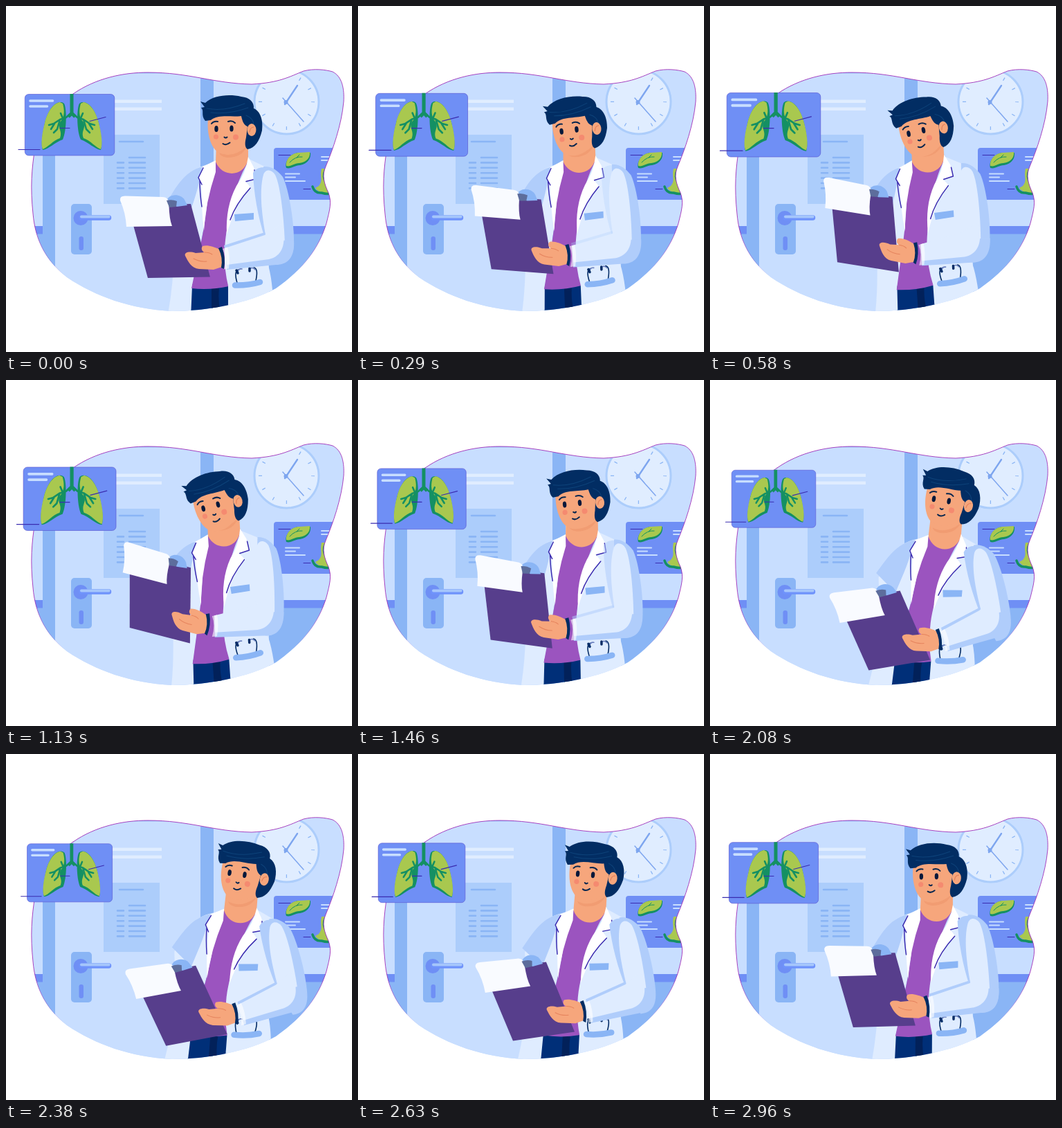
These frames come from a looping animation (500x500 px, 3 s). An HTML page:

```html
<!DOCTYPE html>
<html lang="en">
<head>
<meta charset="utf-8">
<title>Doctor with clipboard</title>
<style>
  html, body { margin: 0; width: 100%; height: 100%; overflow: hidden; background: #fff }
  svg { display: block; width: 100vw; height: 100vh }
  path { stroke-linecap: round; stroke-linejoin: round }
  .bg { fill: #c8deff } .mid { fill: #8ab5f5 } .board { fill: #6f8ff5 }
  .coat { fill: #dfecff } .shade { fill: #b0cdfb } .white { fill: #fff }
  .skin { fill: #f6a67c } .navy { fill: #022d63 } .lime { fill: #a9c84f } .green { fill: #149063 }
  .ink { fill: none; stroke: #3a2cb0; stroke-width: 1.5 }
  .vein { fill: none; stroke: #149063; stroke-width: 2.6 }
  .text { fill: none; stroke: #c8deff; stroke-width: 3.6 }
  .face { fill: none; stroke: #06264f; stroke-width: 2 }
</style>
</head>
<body>
<svg viewBox="0 0 500 500">
  <defs>
    <path id="blob" d="M97 127C130 104 170 96 205 96C265 96 300 112 355 113C395 111 410 102 430 94C445 90 462 92 472 95C486 102 489 120 488 138C485 172 472 208 462 232C456 245 460 257 466 270C471 284 468 294 463 314C452 350 430 380 390 408C350 430 290 441 240 441C180 438 130 420 88 392C55 366 42 335 39 300C35 262 37 235 42 205C48 165 70 145 97 127Z"/>
    <clipPath id="room"><use href="#blob"/></clipPath>
    <linearGradient id="rim" gradientUnits="userSpaceOnUse" x1="0" y1="320" x2="0" y2="390">
      <stop offset="0" stop-color="#a030b8"/>
      <stop offset="1" stop-color="#a030b8" stop-opacity="0"/>
    </linearGradient>
    <g id="lung">
      <path class="green" d="M80 139C70 138 61 150 56 169C53 184 50 200 53 208C62 207 70 197 82 193C88 180 88 148 84 141Q82 139 80 139Z"/>
      <path class="lime" d="M78 139C69 140 60 152 56 169C52 184 50 200 53 207C60 205 68 194 78 191C82 180 74 177 78 168C86 160 84 148 82 141Z"/>
      <path class="vein" d="M95 154L87 161L78 164L69 170L62 172M78 164L74 178L69 183M70 170L65 178M82 162L79 155"/>
    </g>
  </defs>

  <g clip-path="url(#room)">
    <path class="bg" d="M0 80H500V450H0Z"/>
    <path class="mid" d="M30 324H71V450H30ZM380 324H500V450H380Z"/>
    <path class="board" d="M30 318H53V329.500H30ZM380 318H480V329.500H380Z"/>
    <path class="mid" d="M53 80H300V450H281V97.500H71V450H53Z"/>
    <path class="bg" d="M71 97.500H281V450H71Z"/>
    <path fill="#e0edff" d="M120 135.500H225V140H120ZM120 146.500H225V151H120Z"/>
    <path fill="#accdfb" d="M141 186H222V286H141Z"/>
    <path id="rows" fill="none" stroke="#8ab5f5" stroke-width="2.6"/>

    <rect class="mid" x="94" y="286" width="30" height="73" rx="5"/>
    <circle class="board" cx="108" cy="306.500" r="10.500"/>
    <path d="M109 306H148.500" stroke="#6f93fb" stroke-width="7.500"/>
    <path d="M109 304.500H148.500" stroke="#a5c6fb" stroke-width="4"/>
    <rect class="board" x="105.500" y="333" width="6.500" height="20" rx="3.200"/>

    <circle cx="405.500" cy="138.500" r="46.500" fill="#e0edff" stroke="#accdfb" stroke-width="3"/>
    <circle cx="405.500" cy="138.500" r="38" fill="none" stroke="#8ab5f5" stroke-width="5" stroke-dasharray="1.300 18.597" stroke-dashoffset=".65"/>
    <path d="M403 142L421 115" stroke="#7ea6ef" stroke-width="2.400"/>
    <path d="M400 133L430 167" stroke="#7ea6ef" stroke-width="1.500"/>
    <circle cx="404.500" cy="139" r="3" fill="#7ea6ef"/>

    <rect class="board" x="387" y="205" width="100" height="75" rx="4"/>
    <path class="green" d="M405 234C402 224 412 212 424 212L440 212C441 220 436 228 425 230C417 230 412 236 405 234Z"/>
    <path class="lime" d="M405 231C404 221 413 212 424 212L439 211C440 218 435 226 424 227C416 227 411 233 405 231Z"/>
    <path class="vein" style="stroke-width:1" d="M410 226Q418 217 428 218M420 219L424 215"/>
    <path class="lime" d="M456 235C453 247 459 252 452 260L447 263C452 271 466 272 475 268V235Z"/>
    <path class="vein" d="M443 261Q446 271 456 270Q466 273 472 270M461 238Q457 247 463 256" style="stroke-width:3.5"/>
    <path class="text" style="stroke-width:2" d="M456 218H470M456 223H470M404 242.500H424M404 247.500H418M404 253H432"/>
    <path class="ink" style="stroke-width:1" d="M394 215.500H411M430 264.500H440"/>

    <g id="body">
      <path fill="#002f78" d="M268 402H322V450H266Z"/>
      <path d="M297 408H308Q306 424 310 445H297Z" fill="#02215a"/>
      <path class="coat" d="M300 226L282 232C255 242 247 262 236 290L243 360Q241 410 233 450H267L269 405L290 300Z"/>
      <path class="shade" d="M284 232C257 239 246 262 232 284L262 310L272 280Q278 262 284 232Z"/>
      <path fill="#9b54bf" d="M301 226L352 221L342 240C328 272 320 300 317 350Q316 380 322 405Q295 411 268 408L278 360Q289 310 291 280Z"/>
      <path class="skin" d="M304 200L350 190V222C343 248 312 248 303 225Z"/>
      <path fill="#f19c72" d="M308 212Q327 221 348 203Q341 219 320 219Q310 218 308 212Z"/>
      <path class="coat" d="M351 221L382 236C394 248 389 330 378 372Q386 395 387 450H321L321 404Q315 380 316 350C319 305 330 285 349 255Z"/>
      <path class="white" d="M303 223L285 232L278 249L283 262Q282 290 286 325Q288 285 303 240Z"/>
      <path class="ink" d="M285 234L278 248L283 258M280 252Q280 270 283 290"/>
      <path class="white" d="M350 218L358 233L361 250L347 254L353 262Q331 287 319 330Q317 290 333 260Q347 240 350 218Z"/>
      <path class="ink" d="M359 237L361 250L347 253.500M353 263Q332 286 324 309"/>
      <path class="mid" d="M330 301L358 299V308.500L331 311Z"/>
      <g fill="none" stroke="#042c66" stroke-width="1.600">
        <path d="M334 400Q329 383 336 381M361 397Q365 379 358 378"/>
        <path d="M335 384Q336 379 341 380M360 381Q357 377 353 379" stroke="#6a7fbd"/>
        <path d="M333 382L335 386M352 379V383" stroke-width="3.500"/>
      </g>
      <path d="M331 403.500Q350 404 367 399" stroke="#8ab5f5" stroke-width="8.500" fill="none"/>

      <g id="arm">
        <path class="shade" d="M372 232C383 231 392 237 400 247C409 265 417 315 416 345C415 366 405 373 392 373L376 336Z"/>
        <path class="shade fold" d="M357 241C362 233 372 231 384 236L392 340L374 335C364 305 358 270 357 241Z"/>
        <path class="coat" d="M372 244C375 235 384 236 389 244C397 260 402 310 403 345L388 360L376 336C369 300 366 265 372 244Z"/>
      </g>

      <g id="head">
        <path class="skin" d="M292 164C290 185 296 206 308 212C322 218 342 212 350 194L354 160C345 148 300 148 292 164Z"/>
        <path class="navy" d="M281 138L288 140C300 129 322 127 340 131C352 132 359 139 358 148C368 152 372 166 370 180C366 196 360 205 349 207C345 204 345 198 347 190L349 174C344 172 342 168 340 159C325 161 307 156 296 165L288 166C281 158 287 151 282 147L287 146Z"/>
        <path fill="none" stroke="#0d4279" stroke-width="1" d="M290 148Q315 153 345 141M296 154Q322 157 350 147M347 158Q357 162 358 171"/>
        <ellipse class="skin" cx="355" cy="179" rx="6.500" ry="9"/>
        <path d="M352 182Q353 175 358 175" fill="none" stroke="#e5835d" stroke-width="1.200"/>
        <g fill="#f58a70"><circle cx="303.500" cy="189" r="3.600"/><circle cx="332" cy="189.500" r="4"/></g>
        <path class="face" d="M297 170Q300 166 306 167M321 167Q327 165 331 169M313.500 199Q318 202 323.500 197.500"/>
        <path class="face" d="M315.500 189.500Q317.500 191.500 319.500 189.500"/>
        <g id="eyes" fill="#06183a">
          <ellipse cx="304" cy="177.500" rx="2.700" ry="4.500"/>
          <ellipse cx="326" cy="177" rx="2.700" ry="4.500"/>
        </g>
      </g>
    </g>

    <g id="clip">
      <path fill="#573e8c" d="M176 288L267 286L295 391.500L205 393Z"/>
      <path class="mid" d="M231 285C233 271 251 270 258 280L262 288L247 290Z"/>
      <path fill="#f9fbff" d="M165 281Q164 274.500 172 274.500L226 276Q236 276 235.500 288Q236 308 240 318L174 319Q173 299 165 281Z"/>
      <path fill="#5d6d9c" d="M232 281Q240 279 247 282L246 290L236 291Z"/>
    </g>

    <g id="fore">
      <path class="shade fold" d="M315 346L374 327L378 340L317 356Z"/>
      <path class="shade" d="M317 356L378 340L416 338C418 364 406 374 390 374L319 381Z"/>
      <path class="coat" d="M316 350L374 331L398 315C407 345 398 362 380 366L319 374Z"/>
      <path class="white" opacity=".6" d="M313 351L320 348.500Q324 362 322 379.500L315 380.500Q319 364 313 351Z"/>
    </g>

    <g id="hand">
      <path class="skin" d="M311 353C300 347 290 345 284 347C281 351 284 355 287 356L274 357C265 354 257 356 259 361C263 369 268 379 279 380L300 381L312 377Q315 362 311 353Z"/>
      <path d="M287 356Q294 356 298 359M271 365Q280 370 290 369" fill="none" stroke="#e5835d" stroke-width="1"/>
      <path class="navy" d="M307 350L312 348Q318 364 315 380L311 378Q314 364 307 350Z"/>
    </g>
  </g>
  <use href="#blob" fill="none" stroke="url(#rim)" stroke-width=".9"/>

  <g id="chart">
    <rect class="board" x="27.300" y="127.500" width="129.500" height="88.500" rx="5.500" stroke="#5650cf" stroke-width=".6"/>
    <path class="text" d="M35 137H67.500M35 145H59.500"/>
    <use href="#lung"/>
    <use href="#lung" transform="matrix(-1 0 0 1 190 0)"/>
    <path class="vein" style="stroke-width:5;stroke-linecap:butt" d="M95 127V155L90 160M95 155L100 160"/>
    <path class="ink" style="stroke-width:1.200" d="M18 207.500H49M78 176.500H92M121 166.500L144 160.500"/>
  </g>
</svg>
<script>
const LOOP = 3000;
const times = [0, 580, 1130, 1750, 2080, 2630];
const count = times.length;

// Offsets from the rest pose at each of the times above: x, y, then angle last
const tracks = {
  chart: [[0, .046, .034, -.046, -.062, -.03]],
  body: [[0, -4, -4, 2, 4.5, 3]],
  head: [[0, 3.5, 3, 0, -2, 0], [0, 3, 3, -2, -5, -4], [0, -8, -10, 2, 5.5, 3]],
  arm: [[0, 5.3, 7.3, -3.5, -9.7, -7.5]],
  fore: [[0, -12, -16, 6, 20, 15], [0, -3, -4, 1, -2, 0], [0, 2, 4, -1.5, -10, -6]],
  hand: [[0, -15, -21, 5, 19, 14], [0, -7, -11, 3, 11, 8], [0, 8.5, 11.8, 0, -1, -1]],
  clip: [[0, -22, -29, 4, 23, 18], [0, -7, -11, 5, 13, 10], [0, 10, 15.5, .3, -8.6, -7.3]]
};
const pivots = {
  body: [300, 385], head: [327, 225], arm: [375, 250],
  fore: [395, 360], hand: [312, 363], clip: [295, 391]
};

const byId = id => document.getElementById(id);
const setTransform = (id, value) => byId(id).setAttribute('transform', value);
const clamp = (x, low, high) => Math.min(high, Math.max(low, x));
const wrap = i => (i + count) % count;
const timeAt = i => times[wrap(i)] + LOOP * Math.floor(i / count);
const folds = document.querySelectorAll('.fold');

// Smooth periodic curve through the keys
function sample(keys, t) {
  const value = i => keys[wrap(i)];
  const slope = i => {
    const before = timeAt(i) - timeAt(i - 1), after = timeAt(i + 1) - timeAt(i);
    return ((value(i) - value(i - 1)) / before * after
      + (value(i + 1) - value(i)) / after * before) / (before + after);
  };
  let i = count - 1;
  while (times[i] > t) i--;
  const span = timeAt(i + 1) - timeAt(i), u = (t - times[i]) / span, v = 1 - u;
  return v * v * (1 + 2 * u) * value(i) + u * u * (3 - 2 * u) * value(i + 1)
    + span * u * v * (v * slope(i) - u * slope(i + 1));
}

function draw(now) {
  const t = now % LOOP;
  for (const id in pivots) {
    const values = tracks[id].map(keys => sample(keys, t));
    const angle = values.pop(), [dx = 0, dy = 0] = values;
    setTransform(id, `translate(${dx} ${dy}) rotate(${angle} ${pivots[id]})`);
  }
  // The sleeve folds flatten as the arm is raised
  const crease = clamp(1 - sample(tracks.arm[0], t) / 5, 0, 1);
  for (const fold of folds) fold.setAttribute('opacity', crease);

  const zoom = 1 + sample(tracks.chart[0], t);
  setTransform('chart', `translate(92 172) scale(${zoom}) translate(-92 -172)`);
  const open = clamp(Math.abs(t - 1750) / 110, .15, 1);
  setTransform('eyes', `translate(0 ${177.5 * (1 - open)}) scale(1 ${open})`);
  requestAnimationFrame(draw);
}

let rows = 'M164 196H198';
for (let i = 0; i < 7; i++) {
  const y = 219 + i * 7.4;
  rows += `M178 ${y}H201` + (i ? `M161 ${y}H170` : '');
}
byId('rows').setAttribute('d', rows);
requestAnimationFrame(draw);
</script>
</body>
</html>
```
